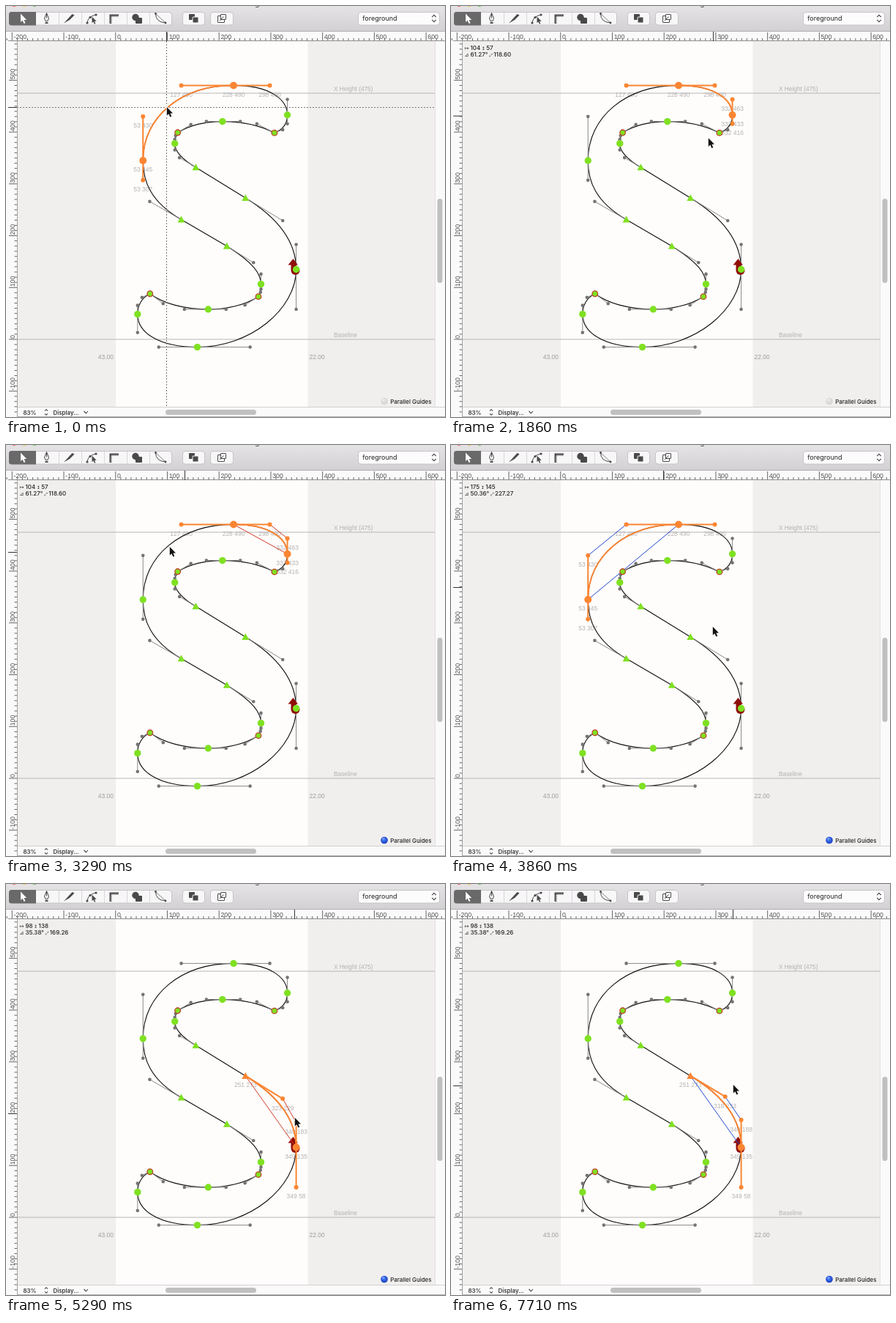
An HTML page with a canvas for the animation above (8000 ms loop, 600 px wide and 561 px high).

```html
<!DOCTYPE html>
<html lang="en">
<head>
<meta charset="utf-8">
<title>Glyph editor</title>
<style>
html, body { margin: 0; width: 100%; height: 100%; overflow: hidden; background: #f1efee; }
canvas { display: block; width: 600px; height: 561px; }
</style>
</head>
<body>
<canvas id="stage"></canvas>
<script>
const W = 600, H = 561, LOOP = 8000, TAU = Math.PI * 2;
const canvas = document.getElementById('stage');
const c = canvas.getContext('2d');
const dpr = window.devicePixelRatio || 1;
canvas.width = W * dpr;
canvas.height = H * dpr;

const UI = 'Inter, "Open Sans", sans-serif';
const LABEL = '"Liberation Sans", Arial, sans-serif';
const SYMBOL = '"DejaVu Sans", sans-serif';
const ORANGE = '#fb8532', GREEN = '#7fe121', GREY = '#757473';
const SCALE = 0.7073;
const X = u => 149.75 + u * SCALE;
const Y = v => 455 - v * SCALE;

// Each node: kind, incoming handle, point, outgoing handle (font units).
const nodes = [
  ['smooth', [298, 490], [228, 490], [127, 490]],
  ['smooth', [53, 430], [53, 345], [53, 307]],
  ['tangent', [66, 266], [127, 231], null],
  ['tangent', null, [215, 180], [266.5, 148]],
  ['smooth', [281, 126], [281, 106.5], [281, 97]],
  ['corner', [280, 91], [276, 82.5], [250, 66]],
  ['smooth', [213.5, 58], [179, 58], [133, 58]],
  ['corner', [92, 69], [66.5, 88], [51, 81]],
  ['smooth', [42.5, 65.5], [42.5, 48.5], [42.5, 13]],
  ['smooth', [83.5, -15], [158, -15], [260, -15]],
  ['smooth', [349, 58], [349, 135], [349, 183]],
  ['tangent', [323, 229], [251, 273], null],
  ['tangent', null, [155, 332], [123.5, 350.5]],
  ['smooth', [114.5, 365.5], [114.5, 378], [114.5, 386]],
  ['corner', [116, 393], [120, 399], [145.5, 414.5]],
  ['smooth', [175.5, 420.5], [206.5, 420.5], [241, 420.5]],
  ['corner', [273, 416], [307, 398.5], [323, 404.5]],
  ['smooth', [332, 416], [332, 433], [332, 463]]
].map(([kind, inn, pt, out]) => ({ kind, inn, pt, out }));
const next = i => (i + 1) % nodes.length;

const info = {
  0: ['175', '145', '50.36°', '227.27'],
  17: ['104', '57', '61.27°', '118.60'],
  10: ['98', '138', '35.38°', '169.26']
};

// Pointer stops: step, x, y.
const path = [
  [0, 220, 139], [1, 223, 139], [4, 300, 128], [6, 361, 118], [7, 362, 117],
  [8, 366, 120], [11, 366, 120], [14, 345, 212], [18, 342, 212], [19, 328, 201],
  [20, 305, 162], [22, 245, 147], [23, 224, 140], [24, 220, 139], [25, 220, 139],
  [26, 291, 195], [27, 358, 249], [28, 380, 300], [29, 387, 319], [30, 387, 319],
  [31, 391, 332], [33, 402, 420], [34, 402, 455], [35, 398, 380], [36, 395, 314],
  [37, 395, 320], [39, 387, 321], [40, 387, 320], [44, 387, 318], [49, 386, 315],
  [50, 386, 314], [53, 386, 276], [54, 386, 275]
];
const drag = [[40, 0], [44, 0.2], [46, 0.5], [47, 0.5], [49, 1]];
const pressed = [[0, 1], [9, 11], [24, 26], [29, 31], [40, 50]];
const PLUGIN_ON = 19, KEY_OFF = 23;

function at(keys, k) {
  if (k <= keys[0][0]) return keys[0].slice(1);
  for (let i = 1; i < keys.length; i++) {
    const a = keys[i - 1], b = keys[i];
    if (k <= b[0]) {
      const f = (k - a[0]) / (b[0] - a[0]);
      return a.slice(1).map((v, j) => v + (b[j + 1] - v) * f);
    }
  }
  return keys[keys.length - 1].slice(1);
}

function selection(k) {
  if (k < 9) return 0;
  if (k < 24) return 17;
  return k < 29 ? 0 : 10;
}

function line(x1, y1, x2, y2, color, width = 1) {
  c.strokeStyle = color;
  c.lineWidth = width;
  c.beginPath();
  c.moveTo(x1, y1);
  c.lineTo(x2, y2);
  c.stroke();
}
const link = (a, b, color, width) => line(X(a[0]), Y(a[1]), X(b[0]), Y(b[1]), color, width);

function rect(x, y, w, h, color) {
  c.fillStyle = color;
  c.fillRect(x, y, w, h);
}

function round(x, y, w, h, r, fill, stroke) {
  c.beginPath();
  c.roundRect(x, y, w, h, r);
  c.fillStyle = fill;
  c.fill();
  if (stroke) { c.strokeStyle = stroke; c.lineWidth = 1; c.stroke(); }
}

function disc(x, y, r, fill, stroke) {
  c.beginPath();
  c.arc(x, y, r, 0, TAU);
  c.fillStyle = fill;
  c.fill();
  if (stroke) { c.strokeStyle = stroke; c.lineWidth = 1.3; c.stroke(); }
}

function shape(pts, fill, stroke, width = 1, close = true) {
  c.beginPath();
  pts.forEach(([x, y]) => c.lineTo(x, y));
  if (close) c.closePath();
  if (stroke) { c.strokeStyle = stroke; c.lineWidth = width; c.stroke(); }
  if (fill) { c.fillStyle = fill; c.fill(); }
}

function bow(x1, y1, cx, cy, x2, y2, color, width = 1) {
  c.beginPath();
  c.moveTo(x1, y1);
  c.quadraticCurveTo(cx, cy, x2, y2);
  c.strokeStyle = color;
  c.lineWidth = width;
  c.stroke();
}

function text(s, x, y, size, color, font = UI, align = 'left', weight = 400) {
  c.font = `${weight} ${size}px ${font}`;
  c.textAlign = align;
  c.textBaseline = 'alphabetic';
  c.fillStyle = color;
  c.fillText(s, x, y);
  return c.measureText(s).width;
}

function curve(a, b) {
  const h1 = a.out || a.pt, h2 = b.inn || b.pt;
  c.bezierCurveTo(X(h1[0]), Y(h1[1]), X(h2[0]), Y(h2[1]), X(b.pt[0]), Y(b.pt[1]));
}

function drawPage() {
  rect(15, 48, 572, 499, '#f1efee');
  rect(150, 48, 262.5, 499, '#fefdfc');
  [[475, 'X Height (475)'], [0, 'Baseline']].forEach(([v, name]) => {
    const y = Y(v);
    line(15, y, 587, y, '#b8b6b5');
    text(name, 448, y - 3.2, 8.3, '#b3b1b0', LABEL);
  });
  text('43.00', 147, 481.5, 8.5, '#a09e9d', LABEL, 'right');
  text('22.00', 414.5, 481.5, 8.5, '#a09e9d', LABEL);
}

function drawNode(n, on) {
  const x = X(n.pt[0]), y = Y(n.pt[1]);
  const fill = on ? ORANGE : GREEN;
  if (n.kind === 'tangent') shape([[x, y - 5], [x + 5, y + 4], [x - 5, y + 4]], fill);
  else if (n.kind === 'corner') disc(x, y, 3.8, fill, '#bd4526');
  else disc(x, y, on ? 5 : 4.7, fill);
}

function drawGlyph(sel, guides) {
  const a = nodes[sel], b = nodes[next(sel)];
  const active = n => n === a || n === b;

  [a, b].forEach(n => [n.inn, n.pt, n.out].forEach(p => {
    if (p) text(`${Math.round(p[0])} ${Math.round(p[1])}`, X(p[0]), Y(p[1]) + 15.5, 8.5, '#b5b3b2', LABEL, 'center');
  }));

  c.beginPath();
  c.moveTo(X(nodes[0].pt[0]), Y(nodes[0].pt[1]));
  nodes.forEach((n, i) => curve(n, nodes[next(i)]));
  c.strokeStyle = '#111';
  c.lineWidth = 1.15;
  c.stroke();

  nodes.forEach(n => [n.inn, n.out].forEach(h => {
    if (h && !active(n)) link(n.pt, h, '#8a8988');
  }));

  // Start-of-contour marker
  const red = '#8f0d08';
  shape([[385.5, 353.5], [392.5, 345], [399, 353.5]], red);
  rect(389.5, 352, 7, 8, red);
  disc(395.5, 361, 6, red);

  c.beginPath();
  c.moveTo(X(a.pt[0]), Y(a.pt[1]));
  curve(a, b);
  c.strokeStyle = ORANGE;
  c.lineWidth = 1.9;
  c.stroke();

  if (guides) {
    link(a.out, b.inn, guides);
    link(a.pt, b.pt, guides);
  }
  nodes.forEach(n => {
    const on = active(n);
    [n.inn, n.out].forEach(h => {
      if (!h) return;
      if (on) link(n.pt, h, ORANGE, 2);
      disc(X(h[0]), Y(h[1]), on ? 3 : 2.3, on ? ORANGE : GREY);
    });
    drawNode(n, on);
  });
}

function drawInfo([dx, dy, angle, dist]) {
  const row = (y, icons, parts) => {
    text(icons[0], 18.5, y, 7, '#222', SYMBOL);
    let x = 26.5 + text(parts[0], 26.5, y, 8, '#222', UI, 'left', 500) + 1.5;
    x += text(icons[1], x, y, 6, '#222', SYMBOL) + 1.5;
    text(parts[1], x, y, 8, '#222', UI, 'left', 500);
  };
  row(59.7, ['↦', '↕'], [dx, dy]);
  row(68.7, ['⊿', '⤢'], [angle, dist]);
}

function drawPlugin(on) {
  const g = c.createRadialGradient(515.5, 537, 0.5, 517, 539.5, 5);
  g.addColorStop(0, on ? '#7fa2f8' : '#efeeed');
  g.addColorStop(0.5, on ? '#2f62e8' : '#dedddc');
  g.addColorStop(1, on ? '#1b3fb8' : '#d5d4d3');
  disc(517, 539.5, 4.8, g);
  text('Parallel Guides', 525.3, 542.5, 7.9, '#222', UI, 'left', 500);
}

function drawRulers(mx, my) {
  rect(0, 35, W, 13, '#fbfafa');
  rect(0, 48, 15, 513, '#fbfafa');
  for (let u = -210; u <= 630; u += 10) {
    const x = X(u), major = u % 100 === 0;
    line(x, major ? 36 : 44, x, 47, '#666');
    if (major) text(u, x + 2.2, 45, 8.8, '#555', LABEL);
  }
  for (let v = -140; v <= 570; v += 10) {
    const y = Y(v), major = v % 100 === 0;
    line(major ? 4 : 11.5, y, 15, y, '#666');
    if (!major) continue;
    c.save();
    c.translate(12, y - 1);
    c.rotate(-Math.PI / 2);
    text(v, 0, 0, 8.8, '#555', LABEL);
    c.restore();
  }
  line(3, 47.5, W, 47.5, '#8f8e8e');
  line(15.5, 47, 15.5, 561, '#a3a2a2');
  line(mx, 35, mx, 48, '#333');
  line(3, my, 15, my, '#333');
}

function arrow(x, y, s, fill, edge) {
  const pts = [[0, 0], [0, 11.6], [2.6, 9.2], [4.5, 13.6], [6.5, 12.7], [4.6, 8.5], [8.2, 8.4]];
  shape(pts.map(p => [x + p[0] * s, y + p[1] * s]), fill, edge, 1.6);
}

function drawIcons() {
  const k = '#4a494a';
  arrow(20, 10.5, 1, '#fff');
  // Pen
  shape([[55.5, 9.5], [58.5, 17], [57, 20.5], [54, 20.5], [52.5, 17]], null, k);
  line(55.5, 10, 55.5, 16.5, k);
  line(53.5, 23, 57.5, 23, k, 2);
  // Knife
  shape([[79, 23.5], [90.5, 11], [93.5, 12.5], [87, 19]], k);
  // Curve with nodes
  bow(111, 23, 112, 14, 123, 12, k);
  [[111, 23], [115, 15.5], [123, 12]].forEach(p => disc(p[0], p[1], 1.6, k));
  arrow(117.5, 14.5, 0.75, k);
  // Ruler corner
  shape([[143, 24], [143, 13], [154, 13]], null, k, 3, false);
  for (let i = 0; i < 4; i++) {
    line(145 + i * 2.7, 13, 145 + i * 2.7, 15, '#f5f5f5', 0.8);
    line(143, 16 + i * 2.2, 145, 16 + i * 2.2, '#f5f5f5', 0.8);
  }
  // Shapes
  disc(177, 15.5, 4.7, k);
  round(177, 16, 9, 8, 1, k);
  // Measure
  bow(204.5, 10.5, 204.5, 22, 218, 23, k);
  line(204.5, 10.5, 218, 23, '#777', 0.9);
  disc(204.5, 10.5, 1.4, k);
  disc(218, 23, 1.4, k);
  // Overlap
  round(250, 11, 8, 8, 1, k);
  round(255, 15, 8, 8, 1, k, '#f7f6f7');
  // Corner square
  round(289.5, 13.5, 9, 9, 0.5, '#fbfbfb', k);
  round(293.5, 11.5, 7, 7, 0.5, '#fbfbfb', k);
  line(292, 20, 297.5, 14.5, k);
}

function stepper(x, y, s) {
  shape([[x - s, y - 1.8], [x, y - 1.8 - s], [x + s, y - 1.8]], null, '#444', 1.1, false);
  shape([[x - s, y + 1.8], [x, y + 1.8 + s], [x + s, y + 1.8]], null, '#444', 1.1, false);
}

function drawChrome() {
  const g = c.createLinearGradient(0, 0, 0, 35);
  g.addColorStop(0, '#e5e3e5');
  g.addColorStop(1, '#d2d0d2');
  rect(0, 0, W, 35, g);
  line(0, 34.5, W, 34.5, '#b0aeb0');
  ['#f2605a', '#f0be3c', '#5fc454'].forEach((color, i) => disc(11 + i * 14, -3.6, 4.5, color));
  text('g', 340, 0, 11, '#444', UI);

  round(4.5, 8.5, 222, 17.5, 3.5, '#f8f7f8', '#c6c4c6');
  round(4, 8, 37, 18.5, [3.5, 0, 0, 3.5], '#6a696a');
  [72, 103, 134, 165, 196].forEach(x => line(x + 0.5, 9, x + 0.5, 26, '#d8d6d8'));
  round(241.5, 8.5, 30, 17.5, 3.5, '#f8f7f8', '#c6c4c6');
  round(279.5, 8.5, 31, 17.5, 3.5, '#f8f7f8', '#c6c4c6');
  round(481.5, 8.5, 111, 17.5, 3.5, '#fdfcfd', '#c6c4c6');
  text('foreground', 487.3, 20.3, 9, '#222', UI);
  stepper(585, 17, 2.8);
  drawIcons();

  // Scroll bars and status strip
  rect(587, 48, 13, 513, '#fafafa');
  line(586.5, 48, 586.5, 547, '#e0dfdf');
  round(589.5, 263, 7, 115, 3.5, '#c1c0c0');
  rect(16, 547, 584, 14, '#fafafa');
  line(16, 547.5, W, 547.5, '#d2d1d1');
  round(218, 551, 124, 7, 3.5, '#c1c0c0');
  text('83%', 23.5, 557.5, 8, '#222', UI, 'left', 500);
  stepper(55, 554.5, 2);
  text('Display...', 64.5, 557.5, 8, '#222', UI, 'left', 500);
  shape([[106.5, 553], [109.3, 556], [112, 553]], null, '#444', 1.1, false);
  line(0, 560.5, W, 560.5, '#b5b4b4');
}

function drawKey(alpha) {
  c.globalAlpha = alpha;
  round(304, 475.5, 34, 70.5, 10, '#2f2e2f');
  line(326, 493.5, 315.5, 536.5, '#fff', 3);
  c.globalAlpha = 1;
}

function drawCrosshair(x, y) {
  c.setLineDash([2, 2]);
  line(x, 48, x, 547, '#777');
  line(15, y, 587, y, '#777');
  c.setLineDash([]);
}

function draw(ms) {
  const k = Math.floor(ms * 7 / 1000 + 0.05);
  const [px, py] = at(path, k);
  const [mx, my] = at(path, k - 1); // ruler marks trail the pointer by a step
  const sel = selection(k);
  const [p] = at(drag, k);
  nodes[11].inn = [323 - 5 * Math.pow(p, 1.5), 229 + 4 * p];
  nodes[10].out = [349, 183 + 5 * p];

  const pluginOn = k >= PLUGIN_ON;
  const parallel = sel === 0 || (sel === 10 && p === 1);
  const guides = pluginOn && (parallel ? '#2348d2' : '#cf3a26');

  c.setTransform(dpr, 0, 0, dpr, 0, 0);
  c.clearRect(0, 0, W, H);
  drawPage();
  drawGlyph(sel, guides);
  if (k >= 1) drawInfo(info[sel]);
  drawPlugin(pluginOn);
  if (pressed.some(([from, to]) => k >= from && k < to)) drawCrosshair(px - 0.5, py - 0.5);
  drawChrome();
  drawRulers(mx - 0.5, my - 0.5);
  if (pluginOn && k < KEY_OFF) drawKey(k === KEY_OFF - 1 ? 0.5 : 1);
  arrow(px - 0.2, py - 1, 1, '#111', '#fff');
}

function frame(now) {
  draw(now % LOOP);
  requestAnimationFrame(frame);
}
draw(0);
requestAnimationFrame(frame);
</script>
</body>
</html>
```
